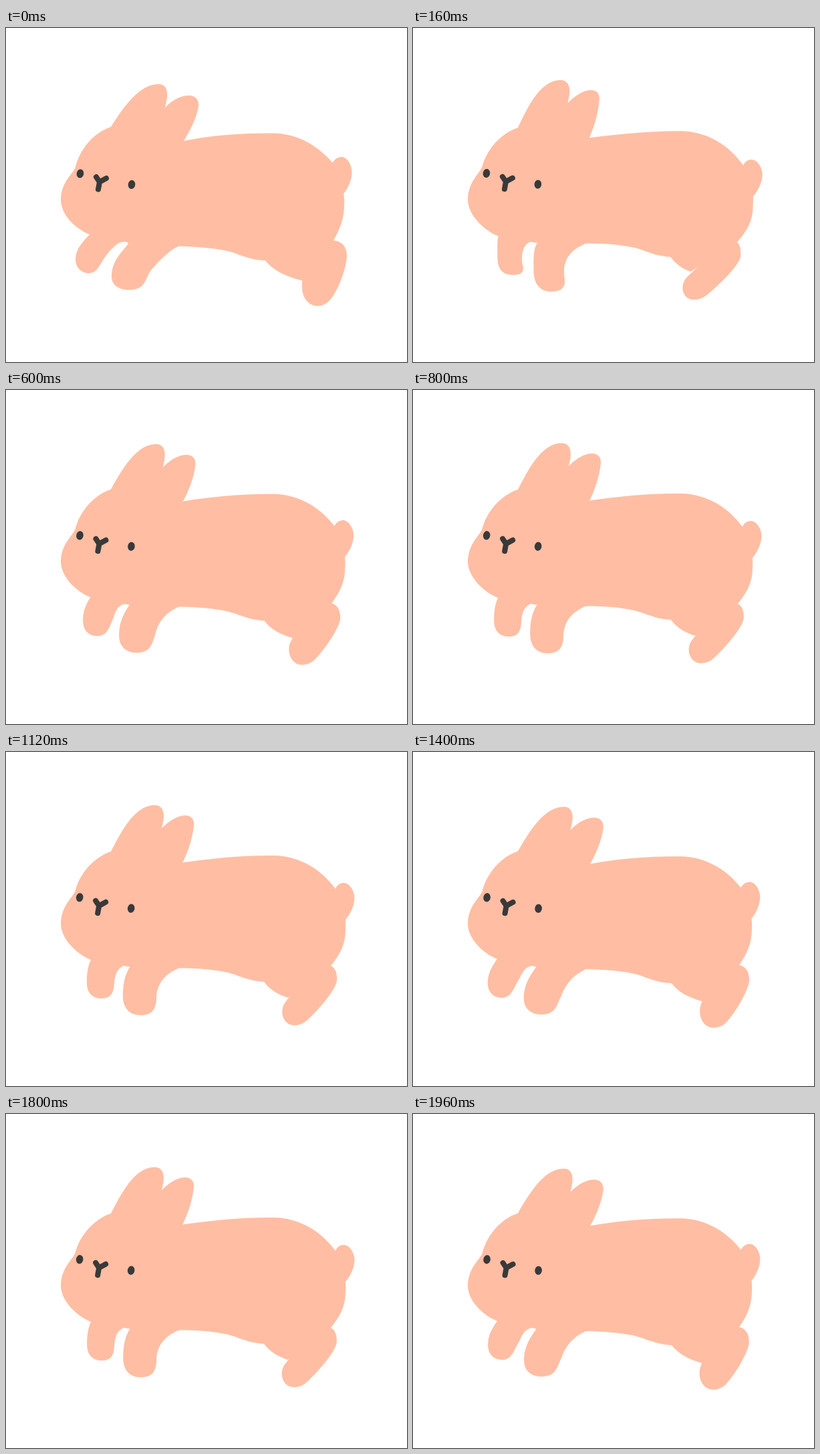
Write an HTML page that moves like this. It is 600 by 500 pixels and loops after 2000 ms.

```html
<!DOCTYPE html>
<html lang="en">
<head>
<meta charset="utf-8">
<title>Running rabbit</title>
<style>
  html, body { margin: 0; width: 100%; height: 100%; overflow: hidden; background: #fff; }
  svg { display: block; width: 600px; height: 500px; }
  #fur { fill: #ffbea3; }
  #face { fill: #393939; stroke: #393939; stroke-linecap: round; stroke-linejoin: round; }
</style>
</head>
<body>
<svg viewBox="0 0 600 500">
  <g id="fur"></g>
  <g id="face">
    <ellipse cx="111" cy="218" rx="5.3" ry="6.6" stroke="none" transform="rotate(10 111 218)"/>
    <ellipse cx="188" cy="234.4" rx="5.3" ry="6.6" stroke="none" transform="rotate(8 188 234.4)"/>
    <path d="M135 223L140 230.5L150 225M140 230.5L138 241.5" fill="none" stroke-width="8"/>
  </g>
</svg>
<script>
const STEP = 40, LOOP = 1000;

// Each part: outline with legs stretched, outline with legs gathered.
const PARTS = {
  body: [
    `M157 148C130 157 110 183 104 208C101 218 82 230 82 258C83 280 103 300 125 309
     L183 321L259 326.5C290 328 325 330 345 338C360 344 375 348 388 348
     C398 361 415 371 443 378L490 318C500 300 506 285 506 265C507 255 505 248 505 247
     C505 225 498 212 488 201C470 180 440 158 400 157.5C350 157 305 161 266 169Z`,
    `M157 149C130 158 110 183 103.5 208C100 218 82 230 82 258C83 280 105 302 127 311
     L187 322L259 323.5C290 323.5 320 326 342 333C357 339 370 343 386 344
     C395 356 405 362 422 368L486 320C500 303 508 287 508 267C508.5 258 508 252 508 250
     C508 228 501 215 493 205C472 176 440 155.5 400 155C355 154.5 305 159.5 264 165.5Z`],
  ears: [
    `M157 148C176 118 200 84 228 84C240 84 242 94 241 104C240 110 239 114 238 119
     C250 106 264 101 274 101C284 101 289 109 288 117C285 136 276 152 266 169L266 200L157 200Z`,
    `M157 149C172 120 192 80 222 79.5C233 79 236 88 236 96C236 103 234 109 233 114
     C246 101 258 95 268 95C278 95 282 102 281 110C279 130 272 150 264 166L264 200L157 200Z`],
  tail: [
    `M480 205L489 201C493 195 498 193 502 193C511 193 518 206 517.5 217C517 229 511 241 505 248L480 250Z`,
    `M484 208L493 204.5C496 198 501 196 505.5 196C514 196 521.5 208 521.5 219C521 232 514 244 508 251L484 252Z`],
  farPaw: [
    `M125 309C115 320 104 331 104 346C104 360 114 367 124 367C140 367 141 347 158 331
     C166 322 172 320 178 320C182 320 183 321 183 323L190 300L140 290Z`,
    `M127 311C123 320 121 330 121 345C121 361 130 369 143 369C158 369 161 360 162 347
     C163 332 167 325 174 321C179 319 185 319 186 322L190 300L140 290Z`],
  nearPaw: [
    `M183 322C180 330 158 345 158 372C158 385 169 392 184 392C212 392 207 372 220 359
     C232 346 245 332 259 326.5L262 300L190 300Z`,
    `M186 321C180 329 175 343 175 365C175 382 184 394 201 394C218 394 224 386 225 370
     C225 345 240 331 259 323.5L262 300L190 300Z`],
  hindLeg: [
    `M490 318C503 319 510 328 510 342C509 358 499 388 488 403C482 412 474 416 466 416
     C452 416 442 402 443 386C443 382 443 379 444 372L450 360L460 330Z`,
    `M486 320C493 323 495.5 332 495 342C493 357 465 388 452 400C446 406 439 409 431 409
     C419 409 413 398 413 389C413 380 417 375 422 369L430 360L460 330Z`]
};

// Turning points of the gallop in steps, alternating stretched and gathered.
const TURNS = [-0.25, 4.5, 8.55, 12.75, 17, 21.3, 25.5];

// Gather amounts at which the two outlines were drawn.
const LOW = 0.053, HIGH = 0.69;

const NUM = /-?\d+(\.\d+)?/g;
const fur = document.getElementById('fur');
const face = document.getElementById('face');

const shapes = Object.values(PARTS).map(([from, to]) => {
  const el = document.createElementNS('http://www.w3.org/2000/svg', 'path');
  fur.append(el);
  return { el, from, a: from.match(NUM).map(Number), b: to.match(NUM).map(Number) };
});

function gather(step) {
  const i = TURNS.findIndex((turn, k) => step < TURNS[k + 1]);
  const p = (step - TURNS[i]) / (TURNS[i + 1] - TURNS[i]);
  return i % 2 ? 1 - p : p;
}

function draw(time) {
  const step = Math.floor((time % LOOP) / STEP);
  const w = (gather(step) - LOW) / (HIGH - LOW);
  for (const { el, from, a, b } of shapes) {
    let i = 0;
    el.setAttribute('d', from.replace(NUM, () => {
      const v = a[i] + (b[i] - a[i]) * w;
      i++;
      return v.toFixed(2);
    }));
  }
  face.setAttribute('transform', `translate(${-0.8 * w} ${-0.3 * w})`);
}

const start = performance.now();
function tick() {
  draw(performance.now() - start);
  requestAnimationFrame(tick);
}
tick();
</script>
</body>
</html>
```
